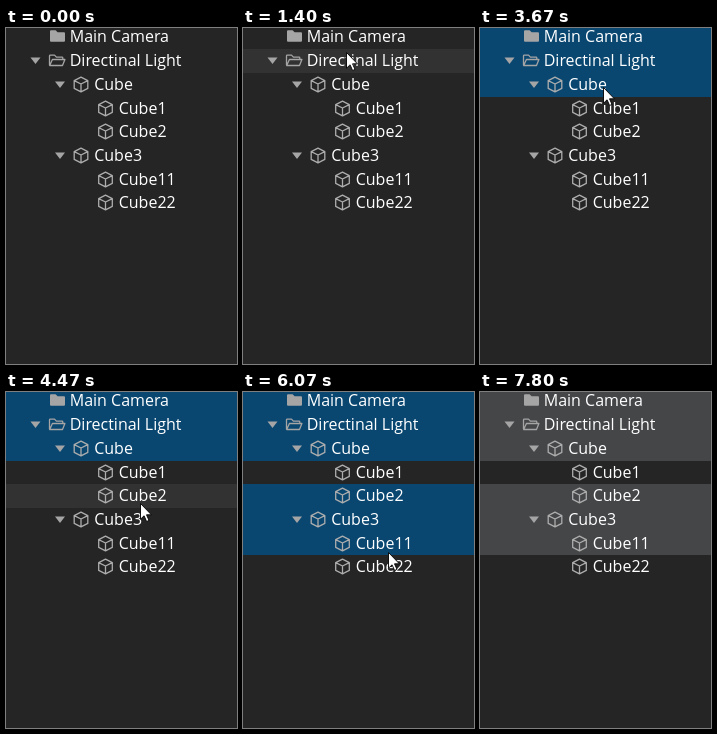
An HTML page that plays this animation: 231x336 px, repeating every 7.99 s.

```html
<!DOCTYPE html>
<html lang="en">
<head>
<meta charset="utf-8">
<title>Scene tree</title>
<style>
html, body { margin: 0; width: 100%; height: 100%; overflow: hidden; background: #252525; }
svg { display: block; width: 231px; height: 336px; }
text { font: 16px "Open Sans", "Noto Sans", sans-serif; fill: #fff; }
</style>
</head>
<body>
<svg viewBox="0 0 231 336" xmlns="http://www.w3.org/2000/svg">
  <defs>
    <path id="caret" d="M-5 -3H5L0 3.5Z" fill="#a5a5a5"/>
    <path id="folder" d="M-6.5 -5.2q0 -1 1 -1h4.6l2 2h6.4q1 0 1 1v7.4q0 1 -1 1h-13q-1 0 -1 -1z" fill="#a5a5a5"/>
    <path id="open" d="M-7 4.8V-4.6q0 -.8 .8 -.8h4.2l1.9 2h5.6q.8 0 .8 .8v1.8M-6.8 5l2.7 -6H8.4L6 5Z" fill="none" stroke="#a5a5a5" stroke-width="1.3" stroke-linejoin="round"/>
    <path id="cube" d="M0 -7.3L6.8 -3.9V3.9L0 7.3L-6.8 3.9V-3.9ZM-6.8 -3.9L0 -.5L6.8 -3.9M0 -.5V7.3" fill="none" stroke="#adadad" stroke-width="1.3" stroke-linejoin="round"/>
  </defs>
  <g id="bands"></g>
  <g id="tree"></g>
  <path id="cursor" d="M.5 .5V16.2L4.1 12.8L6.6 18.5L9 17.4L6.5 11.8H11.4Z" fill="#fff" stroke="#000" stroke-width=".9"/>
</svg>
<script>
const LOOP = 7990, STEP = 200 / 3, ROW = 23.7;
const BASE = "#252525", HOVER = "#323232", ACTIVE = "#094771", IDLE = "#454648";
const ENTER = 330, LEAVE = 6930, BLUR = 7800;

const rows = [
  { label: "Main Camera", icon: "folder", depth: 0, picked: 1800 },
  { label: "Directinal Light", icon: "open", depth: 0, picked: 3670, parent: true },
  { label: "Cube", icon: "cube", depth: 1, picked: 3670, parent: true },
  { label: "Cube1", icon: "cube", depth: 2 },
  { label: "Cube2", icon: "cube", depth: 2, picked: 5070 },
  { label: "Cube3", icon: "cube", depth: 1, picked: 6070, parent: true },
  { label: "Cube11", icon: "cube", depth: 2, picked: 6070 },
  { label: "Cube22", icon: "cube", depth: 2 }
];

// the pointer rests at each point until the next move starts
const moves = [
  { from: 330, to: 1000, x: 110, y: 24 },
  { from: 1130, to: 1400, x: 103, y: 24 },
  { from: 1400, to: 1600, x: 104, y: 19 },
  { from: 1730, to: 2000, x: 115, y: 18 },
  { from: 2400, to: 2600, x: 119, y: 48 },
  { from: 2600, to: 2930, x: 119, y: 64 },
  { from: 3060, to: 3200, x: 123, y: 59 },
  { from: 3930, to: 4470, x: 134, y: 111 },
  { from: 5260, to: 5600, x: 145, y: 160 },
  { from: 6460, to: 6930, x: 209, y: 336 }
];

const $ = id => document.getElementById(id);
const rowTop = i => Math.round(ROW * i - 2.6);

function add(parent, tag, attrs) {
  const el = document.createElementNS("http://www.w3.org/2000/svg", tag);
  for (const k in attrs) el.setAttribute(k, attrs[k]);
  return parent.appendChild(el);
}

const bands = rows.map((row, i) => {
  const y = rowTop(i), mid = y + 11.5, x = 50.5 + 24.5 * row.depth;
  add($("tree"), "use", { href: "#" + row.icon, x, y: mid });
  if (row.parent) add($("tree"), "use", { href: "#caret", x: x - 21, y: mid });
  add($("tree"), "text", { x: x + 13.2, y: mid + 5.5 }).textContent = row.label;
  return add($("bands"), "rect", { x: 0, y, width: 231, height: rowTop(i + 1) - y });
});

// the pointer is sampled 15 times a second
function pointer(t) {
  const s = Math.round(Math.floor((t + 4) / STEP) * STEP);
  let x = 176, y = 164;
  for (const m of moves) {
    const k = Math.min(1, Math.max(0, (s - m.from) / (m.to - m.from)));
    x += (m.x - x) * k;
    y += (m.y - y) * k;
  }
  return { x: Math.round(x), y: Math.round(y) };
}

function draw(t) {
  const shown = t >= ENTER && t < LEAVE;
  const { x, y } = pointer(t);
  $("cursor").setAttribute("visibility", shown ? "visible" : "hidden");
  $("cursor").setAttribute("transform", `translate(${x} ${y})`);
  bands.forEach((band, i) => {
    const over = shown && y >= rowTop(i) && y < rowTop(i + 1);
    const picked = t >= rows[i].picked;
    band.setAttribute("fill", picked ? (t < BLUR ? ACTIVE : IDLE) : over ? HOVER : BASE);
  });
}

const start = performance.now();
function tick() {
  draw((performance.now() - start) % LOOP);
  requestAnimationFrame(tick);
}
tick();
</script>
</body>
</html>
```
